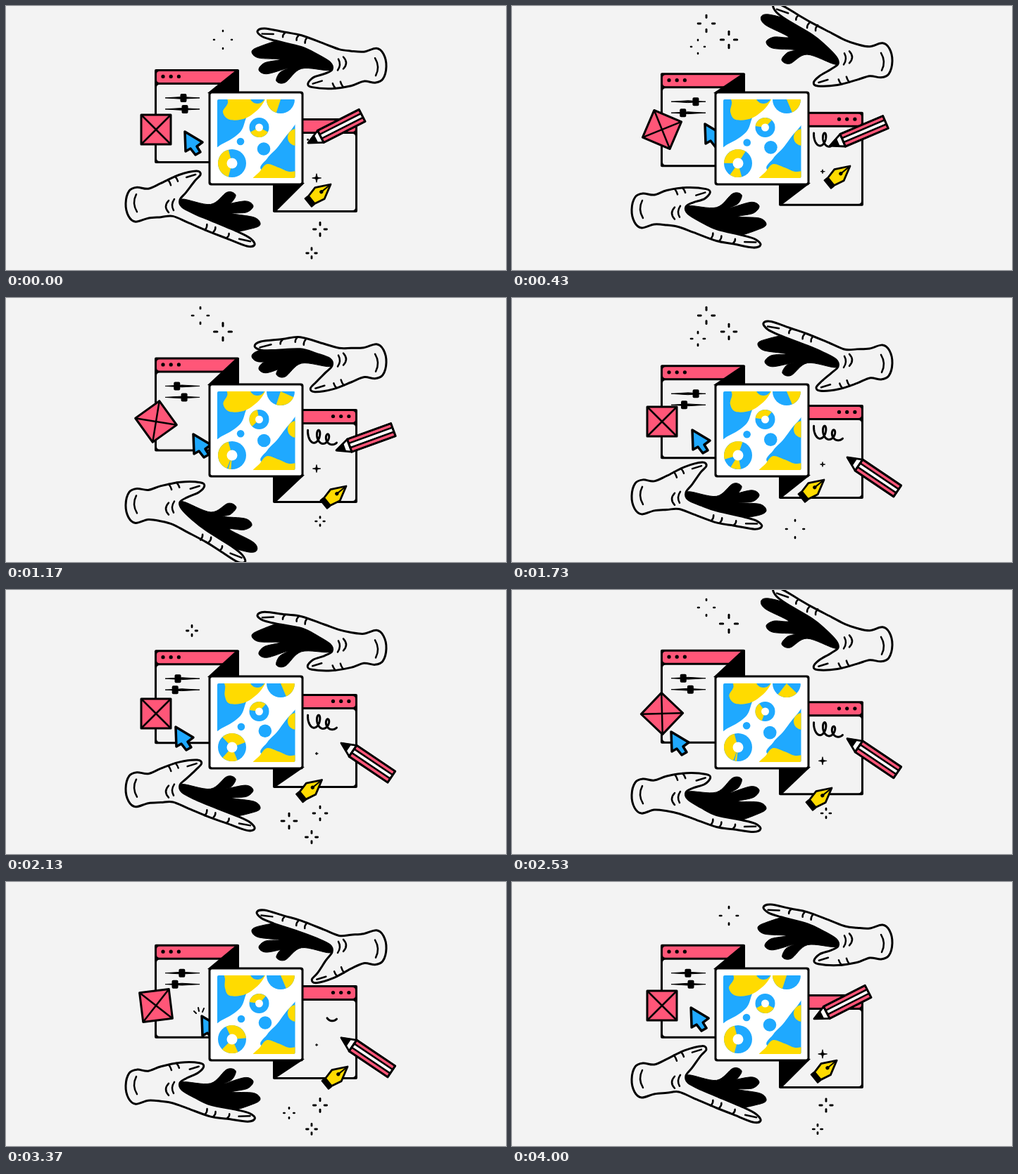
These frames come from a looping animation (710 by 376 pixels, 4.03 s). An HTML page with a canvas:

```html
<!DOCTYPE html>
<html lang="en">
<head>
<meta charset="utf-8">
<title>Creative tools</title>
<style>
html, body { margin: 0; width: 100%; height: 100%; overflow: hidden; background: #f3f3f3; }
canvas { display: block; width: 710px; height: 376px; }
</style>
</head>
<body>
<canvas id="stage"></canvas>
<script>
const LOOP = 4030, TAU = Math.PI * 2, RAD = Math.PI / 180;
const BG = '#f3f3f3', INK = '#000', PINK = '#ff5678', BLUE = '#1fa9ff', YELLOW = '#ffdb00';
const canvas = document.getElementById('stage');
const g = canvas.getContext('2d');
const dpr = window.devicePixelRatio || 1;
canvas.width = 710 * dpr;
canvas.height = 376 * dpr;

const smooth = x => { x = Math.max(0, Math.min(1, x)); return x * x * (3 - 2 * x); };
const lerp = (a, b, u) => a + (b - a) * u;
const mix = (a, b, u) => [lerp(a[0], b[0], u), lerp(a[1], b[1], u)];
const shift = (p, x, y) => [p[0] + x, p[1] + y];
// 1 near the centre, easing to 0 outside the flat part
const hump = (x, centre, flat, fade) => 1 - smooth((Math.abs(x - centre) - flat) / fade);

// Eased travel through stops [time, x, y], looping.
function travel(stops, t) {
  const i = stops.findLastIndex(s => s[0] <= t);
  const a = stops[i], b = stops[(i + 1) % stops.length];
  const u = smooth((t - a[0]) / ((b[0] || LOOP) - a[0]));
  return mix(a.slice(1), b.slice(1), u);
}

function paint(fill, width) {
  if (fill) { g.fillStyle = fill; g.fill(); }
  if (width) { g.strokeStyle = INK; g.lineWidth = width; g.stroke(); }
}
function poly(pts, fill, width) {
  g.beginPath();
  pts.forEach(p => g.lineTo(...p));
  g.closePath();
  paint(fill, width);
}
function line(x1, y1, x2, y2, width) {
  g.beginPath(); g.moveTo(x1, y1); g.lineTo(x2, y2); paint(null, width);
}
function crease(p, dx, dy, bend) {
  g.beginPath();
  g.moveTo(...p);
  g.quadraticCurveTo(p[0] + dx / 2 + bend, p[1] + dy / 2, p[0] + dx, p[1] + dy);
  paint(null, 2.5);
}
function disc(x, y, r, fill) {
  g.beginPath(); g.arc(x, y, r, 0, TAU); paint(fill);
}
function box(x, y, w, h, r, fill, width) {
  g.beginPath(); g.roundRect(x, y, w, h, r); paint(fill, width);
}
function blob(pts, fill, width) {
  const n = pts.length, p = k => pts[(k + n) % n];
  g.beginPath();
  g.moveTo(...pts[0]);
  for (let i = 0; i < n; i++) {
    const a = p(i - 1), b = p(i), c = p(i + 1), d = p(i + 2);
    g.bezierCurveTo(b[0] + (c[0] - a[0]) / 6, b[1] + (c[1] - a[1]) / 6,
      c[0] - (d[0] - b[0]) / 6, c[1] - (d[1] - b[1]) / 6, c[0], c[1]);
  }
  g.closePath();
  paint(fill, width);
}

// The fingers flick up, dip and settle while wrist and thumb swing.
function hand(phase) {
  const lift = hump(phase, .285, .075, .1), dip = hump(phase, .575, 0, .14);
  const w = 4 - 8.3 * Math.cos(TAU * (phase - .235));
  const swing = TAU * (phase - .215);
  const ty = 119 - 15.5 * Math.cos(swing) + 5.5 * Math.cos(2 * swing);
  const thumb = [431 + .2 * (ty - 122), ty];
  const tip = [357 + 14 * lift - 4 * dip, 36 - 37 * lift + 33 * dip];
  const palm = [473, 56 + 1.75 * w];
  const rise = palm[1] - tip[1];
  const knuckle = shift(mix(tip, palm, .54), 0, .27 * rise - 15);
  const under = shift(knuckle, 0, 17);
  const crotch = [463, 84 + w * 1.1];
  const heart = mix(under, crotch, .5);

  const len = Math.hypot(tip[0] - knuckle[0], tip[1] - knuckle[1]);
  const ux = (tip[0] - knuckle[0]) / len, uy = (tip[1] - knuckle[1]) / len;
  const finger = (back, up) => shift(tip, -ux * back - uy * up, -uy * back + ux * up);
  const joint = mix(finger(10, 5), knuckle, .55);

  const ends = [[349, 65], [359, 91], [384, 107]].map((p, i) =>
    shift(p, 5 * lift - 3 * i * lift, (10 * i - 50) * lift + (18 - 8 * i) * dip));
  const dark = [finger(38, -9)];
  ends.forEach((b, i) => {
    const l = Math.hypot(b[0] - heart[0], b[1] - heart[1]);
    const fx = (b[0] - heart[0]) / l, fy = (b[1] - heart[1]) / l;
    dark.push(shift(b, -fx * 10 - fy * 8, -fy * 10 + fx * 8), b,
      shift(b, -fx * 10 + fy * 8, -fy * 10 - fx * 8));
    if (ends[i + 1]) dark.push(mix(mix(b, ends[i + 1], .5), heart, .4));
  });
  dark.push(shift(mix(ends[2], crotch, .45), 0, -9), shift(crotch, -3, 4), shift(crotch, 0, -8), under);
  blob(dark, INK, 1);

  const heel = [490, 110 + w * 1.15];
  const edge = u => shift(mix(shift(thumb, 6, 5), heel, u), 0, 3 * Math.sin(Math.PI * u));
  blob([
    tip, finger(10, 5), joint, knuckle, mix(knuckle, palm, .6), palm,
    [490, 60 + w * 1.3], [508, 62 + w], [526, 57 + w], [536, 65 + w], [540, 83 + w],
    [535, 101 + w], [524, 106 + w], [508, 104 + w], heel, edge(.5), edge(0), thumb,
    shift(thumb, 8, -9), shift(mix(thumb, crotch, .7), 0, 2), shift(crotch, 0, 3),
    shift(crotch, -3, -7), shift(heart, 0, -4), under, finger(26, -11), finger(8, -7)
  ], BG, 3);

  crease(finger(7, -3), 16, -uy * 16 - 1, 0);
  crease(shift(joint, 0, 1), -3, 6, -2);
  crease(shift(knuckle, -4, 0), -3, 7, -2);
  crease(shift(knuckle, 8, 3), -3, 8, -2);
  crease(shift(crotch, 9, -12), -1, 16, 5);
  crease(shift(crotch, 16, -15), 0, 17, 8);
  crease([524, 71 + w], 1, 25, 7);
  crease(edge(.6), -4, -7, -1);
  crease(edge(.8), -4, -8, -1);
  crease(shift(thumb, 7, 0), 13, -4, 0);
}

function frame(x, y) {
  box(x, y - 1, 120, 134, 2, INK);
  box(x + 3, y + 2, 114, 16, 4, PINK);
  box(x + 3, y + 21, 114, 109, 4, BG);
}
function dots(x, y) {
  for (let i = 0; i < 3; i++) disc(x + i * 11.2, y, 2.6, INK);
}
function slider(y, x) {
  poly([[226, y], [250, y - 1.4], [275, y], [250, y + 1.4]], INK, 1);
  box(x - 4.5, y - 6, 9, 12, 2, INK);
}

function crossBox(phase) {
  g.save();
  g.translate(213, 176);
  g.rotate(45 * RAD * (smooth((phase - .158) / .11) + smooth((phase - .523) / .2)));
  box(-21, -21, 42, 42, 0, PINK, 3);
  line(-20, -20, 20, 20, 2.5);
  line(-20, 20, 20, -20, 2.5);
  g.restore();
}

const CURSOR = [[0, 253, 178], [430, 273, 167], [1170, 265, 193], [1730, 255, 187], [2530, 225, 201], [3370, 277, 190]];
const NIB = [[0, 461, 254], [430, 480, 228], [1170, 483, 268], [1730, 443, 259], [2530, 454, 282], [3370, 485, 263]];

function cursor(t) {
  g.save();
  g.translate(...travel(CURSOR, t));
  poly([[1, 1], [2, 29], [9, 25], [16, 34], [23, 30], [18, 22], [26, 16]], BLUE, 3.5);
  if (t > 3270 && t < 3470) {
    line(-10, -6, -7, -3, 2);
    line(-4, -11, -3, -6, 2);
    line(4, -10, 2, -5, 2);
  }
  g.restore();
}

// Shrinking loops of handwriting, drawn between two shares of the stroke.
function scribble(from, to, top) {
  if (from >= to) return;
  g.beginPath();
  for (let s = 0; s <= 100; s++) {
    const a = lerp(-.6, 15.2, lerp(from, to, s / 100));
    g.lineTo(434 + 2.05 * a - 5 * Math.cos(a), top + 36 + .55 * a + (11 - .35 * a) * Math.sin(a));
  }
  paint(null, 3);
}

function pencil(x, y, turn) {
  g.save();
  g.translate(x, y);
  g.rotate(turn * RAD);
  poly([[0, 0], [20, -9.5], [20, 9.5]], '#fff', 2.8);
  poly([[0, 0], [12, -5.5], [12, 5.5]], INK, 2);
  [PINK, '#fff', PINK].forEach((fill, i) => box(20, i * 6.4 - 9.6, 66, 6.4, 0, fill, 2.4));
  box(20, -9.6, 66, 19.2, 0, null, 3);
  g.restore();
}

function nib(t) {
  g.save();
  g.translate(...travel(NIB, t));
  g.rotate(Math.atan2(27, -33));
  poly([[0, 0], [20, -10.5], [35, -7], [35, 7], [20, 10.5]], YELLOW, 2.8);
  box(36, -7.5, 5, 15, 0, INK, 2);
  line(0, 0, 16, 0, 2);
  disc(17, 0, 2.6, INK);
  g.restore();
}

function star(x, y, r) {
  const pts = [];
  for (let i = 0; i < 8; i++) {
    const d = i % 2 ? r * .28 : r, a = i * TAU / 8;
    pts.push([x + d * Math.cos(a), y + d * Math.sin(a)]);
  }
  poly(pts, INK, .8);
}

// x, y, reach, start within the twinkle
const SPARKS = [[276, 25, 12, .2], [308, 48, 13, .41], [264, 58, 10, .06],
  [446, 318, 10, .7], [434, 352, 9, .85], [402, 329, 13, .002]];
function spark([x, y, reach, start], phase) {
  const p = ((phase - start + 1) % 1) / .6;
  if (p >= 1) return;
  const out = reach * (1 - .45 * (1 - p) ** 3), swell = Math.sqrt(Math.sin(Math.PI * p));
  const dash = reach * .34 * swell;
  for (let i = 0; i < 4; i++) {
    const c = Math.cos(i * TAU / 4), s = Math.sin(i * TAU / 4);
    line(x + c * (out - dash), y + s * (out - dash), x + c * out, y + s * out, 2.4 + reach * .05 * swell);
  }
}

function wedge(x, y, r, mid, spread) {
  g.beginPath();
  g.moveTo(x, y);
  g.arc(x, y, r, (mid - spread) * RAD, (mid + spread) * RAD);
  paint(YELLOW);
}

function art(beat) {
  const m = .5 - .5 * Math.cos(beat);
  box(287.5, 121.5, 135, 134, 4, INK);
  box(290.5, 124.5, 129, 128, 2, '#fff');
  g.save();
  g.beginPath(); g.roundRect(300, 133, 110.5, 112, 2); g.clip();

  blob([[290, 120], [364, 122], [362, 139], [343, 156], [333, 179], [308, 196], [288, 199]], BLUE);
  blob([[316 - 5 * m, 120], [315 - 4 * m, 138], [308 + 3 * m, 151], [318, 162], [342, 159], [364, 140], [366, 120]], YELLOW);
  disc(357, 128, 11, BLUE);

  disc(390, 133, 20, BLUE);
  wedge(390, 133, 20, 150 - 125 * smooth(4 * m), 42);

  blob([[420, 166 + 4 * m], [403, 179], [385, 202], [371, 217], [364, 234], [420, 244]], BLUE);
  disc(412, 187, 12, YELLOW);
  blob([[350, 254], [361, 235], [371, 225], [387, 230], [402, 236], [420, 235], [420, 254]], YELLOW);

  disc(359.5, 173, 14, BLUE);
  wedge(359.5, 173, 14, 90 + 160 * smooth(4 * m), 62);
  disc(359.5, 173, 5.5, '#fff');

  disc(321, 224, 20, BLUE);
  wedge(321, 224, 20, 180 + 120 * m * m, 75 - 20 * m);
  wedge(321, 224, 20, 100, 35 * m);
  disc(321, 224, 7.5, '#fff');

  disc(333 + m, 193 + 2 * m, 5.3, BLUE);
  disc(366 + 2 * m, 203.5 - 3 * m, 9.3, BLUE);
  g.restore();
}

function draw(now) {
  const t = now % LOOP;
  const beat = TAU * t / LOOP * 3, sway = t / LOOP * 2 % 1, twinkle = t / LOOP * 6 % 1;
  const snap = s => s * (1.5 - .5 * s * s);
  const s = snap(Math.sin(beat + .04)), c = Math.cos(beat);
  const left = 90.5 + 5.8 * s, right = 154.5 + 6.5 * c;

  g.setTransform(dpr, 0, 0, dpr, 0, 0);
  g.fillStyle = BG;
  g.fillRect(0, 0, 710, 376);
  g.lineCap = g.lineJoin = 'round';

  frame(211, left);
  dots(223, left + 9.5);
  poly([[327, left], [331, left], [331, 130], [286, 124]], INK);
  slider(left + 40, 251.3 + 9.8 * s);
  slider(left + 56, 247 + 7 * snap(c));
  crossBox(sway);
  cursor(t);

  frame(379, right);
  dots(464.5, right + 9.5);
  poly([[379, 250], [424, 252], [385, right + 130], [379, right + 132]], INK);
  const wrote = smooth(t / 800), wiped = smooth((t - 3050) / 420);
  scribble(wiped, wrote, right);
  star(441, right + 84, 4 + 2.3 * c);
  nib(t);

  const pen = wrote - wiped, rest = smooth((t - 1170) / 400) - smooth((t - 3550) / 430);
  pencil(lerp(429 + 40 * pen, 476, rest),
    lerp(right + 34 + 24 * pen, 219 + 8 * Math.sin(beat - .42), rest),
    lerp(7 * pen - 27, 34, rest));

  art(beat);
  hand(sway);
  g.save();
  g.translate(710, 376);
  g.scale(-1, -1);
  hand((sway + .79) % 1);
  g.restore();
  SPARKS.forEach(p => spark(p, twinkle));
}

const began = performance.now();
function tick() {
  draw(performance.now() - began);
  requestAnimationFrame(tick);
}
tick();
</script>
</body>
</html>
```
